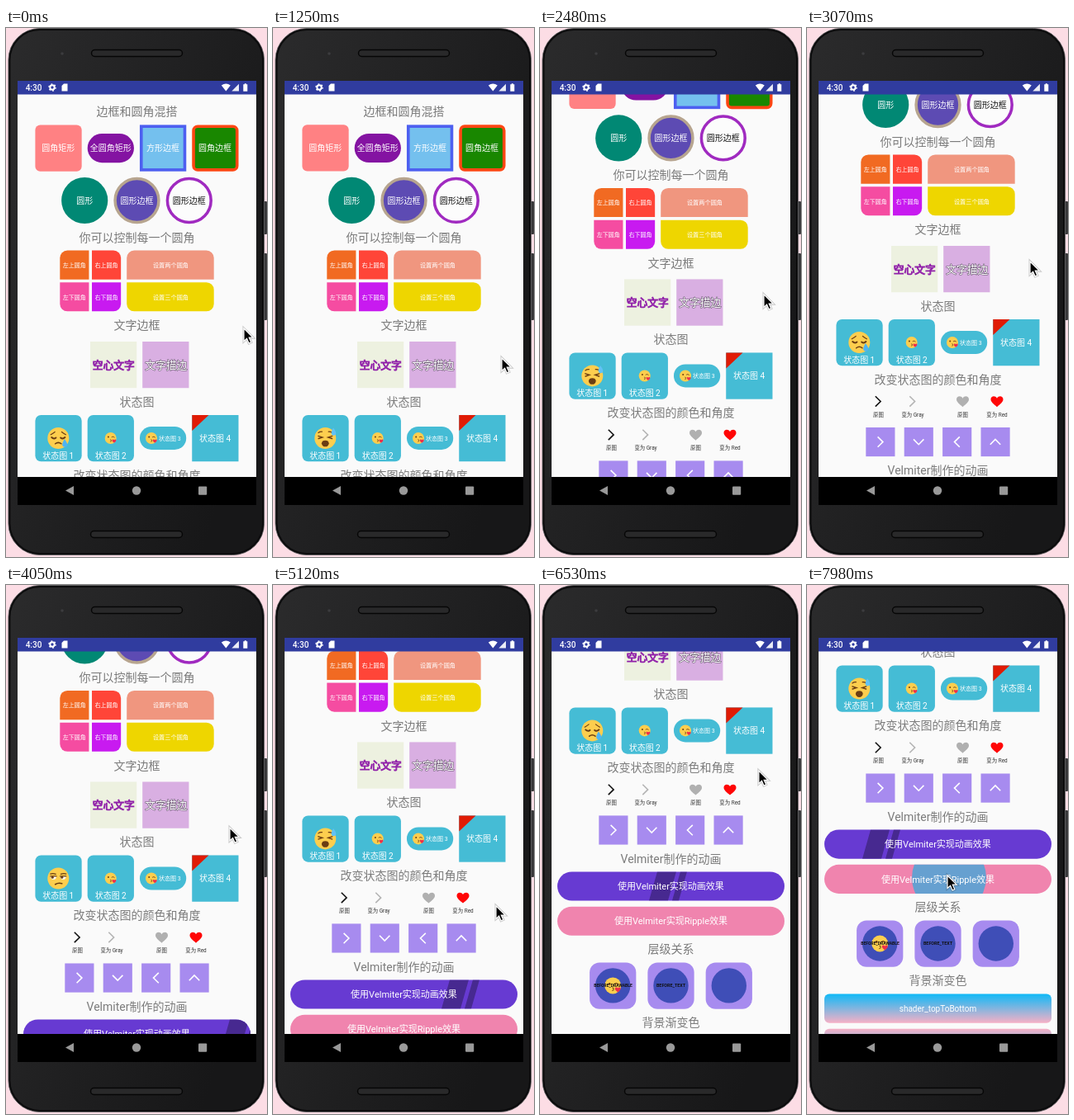
Animation of 316 by 641 pixels, one loop 8 s. Source, as an HTML page:

```html
<!DOCTYPE html>
<html lang="zh-CN">
<head>
<meta charset="utf-8">
<style>
html, body { margin: 0; width: 100%; height: 100%; overflow: hidden; background: #fcdde5; }
svg { display: block; width: 316px; height: 641px; }
text { font-family: Roboto, "Noto Sans CJK SC", "Noto Sans CJK", sans-serif; }
</style>
</head>
<body>
<svg id="stage" viewBox="0 0 316 641"></svg>
<script>
const LOOP = 8000;
const CX = 158.5;
const stage = document.getElementById('stage');

// ---- drawing helpers: each returns SVG markup ----
const path = (d, fill, extra = '') => `<path d="${d}" fill="${fill}" ${extra}/>`;
const line = (d, color, width) =>
  path(d, 'none', `stroke="${color}" stroke-width="${width}" stroke-linecap="round"`);
const rect = (x, y, w, h, fill, r = 0, extra = '') =>
  `<rect x="${x}" y="${y}" width="${w}" height="${h}" rx="${r}" fill="${fill}" ${extra}/>`;
const circle = (x, y, r, fill, extra = '') =>
  `<circle cx="${x}" cy="${y}" r="${r}" fill="${fill}" ${extra}/>`;
const label = (s, x, y, size, fill = '#fff', extra = '') =>
  `<text x="${x}" y="${y + size * 0.37}" font-size="${size}" fill="${fill}" text-anchor="middle" ${extra}>${s}</text>`;
const heading = (s, y) => label(s, CX, y, 14, '#7b7b7b');
const bordered = (color, width) => `stroke="${color}" stroke-width="${width}"`;
const at = (x, y, markup, scale = 1, rotation = 0) =>
  `<g transform="translate(${x} ${y}) rotate(${rotation}) scale(${scale})">${markup}</g>`;

// Rectangle with separate corner radii: top left, top right, bottom right, bottom left
function corners(x, y, w, h, fill, [a, b, c, d]) {
  return path(`M${x + a} ${y}h${w - a - b}a${b} ${b} 0 0 1 ${b} ${b}v${h - b - c}
    a${c} ${c} 0 0 1 ${-c} ${c}h${c + d - w}a${d} ${d} 0 0 1 ${-d} ${-d}v${a + d - h}
    a${a} ${a} 0 0 1 ${a} ${-a}z`, fill);
}

const chevron = (x, y, color, rotation = 0) =>
  at(x, y, path('M-3.2 -6.2L3.1 0L-3.2 6.2', 'none', bordered(color, 1.6)), 1, rotation);
const heart = (x, y, color, scale = 1) =>
  at(x, y, path('M0 6.5C-4 3-7.5 .5-7.5-2.6C-7.5-7-2-7.6 0-4C2-7.6 7.5-7 7.5-2.6C7.5 .5 4 3 0 6.5z', color), scale);

// ---- faces, drawn at radius 10 ----
const INK = '#6b3d12';
const features = {
  sad: line('M-7-3.2Q-5-4.3-3.2-5.8M7-3.2Q5-4.3 3.2-5.8', INK, 0.9) +
    line('M-6.2-.8Q-4.2 1.2-2.2-.4M6.2-.8Q4.2 1.2 2.2-.4', INK, 1.5) +
    line('M-2.8 5.2Q0 3 2.8 5.2', INK, 1.2) +
    path('M5.8 .8Q9.3 5.3 8.2 7.3Q6 9.5 3.9 7.1Q3.3 4.8 5.8 .8z', '#4fb4f2'),
  unamused: line('M-7.3-4.2Q-5-5-2.4-4M2.4-4Q5-5 7.3-4.2', INK, 1) +
    path('M-7.3-2h5.6q-.4 3-2.8 3t-2.8-3zM1.7-2h5.6q-.4 3-2.8 3t-2.8-3z', '#fff') +
    line('M-7.3-2h5.6M1.7-2h5.6', INK, 0.9) +
    circle(-5.4, -0.9, 1.2, INK) + circle(3.4, -0.9, 1.2, INK) +
    line('M-2.8 5.6Q0 3.8 3.4 4.8', INK, 1.2),
  sweat: line('M-6.5-5Q-5-6.2-3-6M6.5-5Q5-6.2 3-6', INK, 0.9) +
    line('M-6.5-2L-2.7-.8L-6.3 .4M6.5-2L2.7-.8L6.3 .4', INK, 1.1) +
    path('M-3.4 4.8Q-3 2.2 0 2.2T3.4 4.8Q3 8 0 8T-3.4 4.8z', INK) +
    path('M7.5-9.5Q11-5 9.6-3.2Q7.7-1.5 5.9-3.4Q5-5.5 7.5-9.5z', '#62c2f5'),
  kiss: circle(-4, -2, 1.4, INK) + line('M2-2Q4.5-4 6.5-1.5', INK, 1.2) +
    line('M-.5 2.5Q2.5 3 .5 4.3Q2.5 5.5-.5 6', INK, 1) + heart(6, 5, '#ee2f4a', 0.46)
};
const face = (kind, x, y, r) => at(x, y, circle(0, 0, 10, '#fdce4e') + features[kind], r / 10);

// ---- phone ----
const phone = `
  ${rect(311, 210, 5, 40, '#39393b', 1)}${rect(311, 273, 5, 81, '#39393b', 1)}
  ${rect(3, 0.5, 309.5, 638, 'url(#body)', 38, bordered('#5c5c5e', 1))}
  ${rect(4.5, 2, 306.5, 635, 'none', 36.5, bordered('#0c0c0d', 2))}
  ${rect(103.5, 26.5, 110, 8, '#29292a', 4, bordered('#060606', 1.5))}
  ${rect(102.5, 609.5, 111, 8, '#29292a', 4, bordered('#060606', 1.5))}
  ${circle(68, 31, 1.8, '#3c3c3e')}
  ${rect(14, 64, 289, 514, '#000')}${rect(14, 80, 289, 464, '#fafafa')}`;

const bars = `
  ${rect(14, 64, 289, 16.5, '#303c9f')}
  ${label('4:30', 33.5, 72.3, 10, '#fff', 'font-weight="500"')}
  ${circle(56, 72, 2.7, 'none', bordered('#fff', 2))}
  ${circle(56, 72, 4.1, 'none', bordered('#fff', 1.3) + ' stroke-dasharray="1.9 2.39"')}
  ${path('M70 67.5h4.5v9h-7v-6.5z', '#fff')}
  ${path('M260.8 69.5Q266.3 65.7 271.8 69.5L266.3 76.5z', '#fff')}
  ${path('M282 67.8v8.7h-8.7z', '#fff', 'opacity=".9"')}
  ${path('M288.8 67.3h2v1h1.5v8.4h-5v-8.4h1.5z', '#fff')}
  ${path('M82 555v11l-10-5.5z', '#999')}${circle(158, 560.5, 5.2, '#999')}
  ${rect(233, 555.5, 10.2, 10.2, '#999', 1)}`;

// ---- scrolling page ----
const TILE = '#45bcd5', LILAC = '#a78bef';
const BIG = 56.25, SMALL = 35.15;
const column = i => 35.4 + i * 63.28;

const shapes = `
  ${heading('边框和圆角混搭', 101)}
  ${rect(column(0), 117.4, BIG, BIG, '#ff8183', 6)}${label('圆角矩形', 63.2, 145.5, 10)}
  ${rect(column(1), 128, BIG, SMALL, '#8413a2', 17.5)}${label('全圆角矩形', 126.7, 145.5, 10)}
  ${rect(column(2) + 1.8, 119.2, 52.7, 52.7, '#74c0ee', 0, bordered('#4d5ff0', 3.6))}${label('方形边框', 190, 145.5, 10)}
  ${rect(column(3) + 1.8, 119.2, 52.7, 52.7, '#198700', 5, bordered('#ff4613', 3.6))}${label('圆角边框', 253, 145.5, 10)}
  ${circle(95.2, 209, 28.1, '#018874')}${label('圆形', 95.2, 209, 10)}
  ${circle(CX, 209, 26.4, '#5d4bb3', bordered('#b7a58f', 3.5))}${label('圆形边框', CX, 209, 10)}
  ${circle(221.8, 209, 26.4, '#fcfcfc', bordered('#a02ac0', 3.5))}${label('圆形边框', 221.8, 209, 10, '#111')}
  ${heading('你可以控制每一个圆角', 253.5)}
  ${corners(65.3, 269.5, SMALL, SMALL, '#f16a22', [9, 0, 0, 0])}${label('左上圆角', 82.8, 287, 7)}
  ${corners(104, 269.5, SMALL, SMALL, '#ff4538', [0, 9, 0, 0])}${label('右上圆角', 121.5, 287, 7)}
  ${corners(65.3, 308.2, SMALL, SMALL, '#f54ca1', [0, 0, 0, 9])}${label('左下圆角', 82.8, 326, 7)}
  ${corners(104, 308.2, SMALL, SMALL, '#c81af0', [0, 0, 9, 0])}${label('右下圆角', 121.5, 326, 7)}
  ${corners(146.2, 269.5, 105.5, SMALL, '#f0967f', [9, 9, 0, 0])}${label('设置两个圆角', 199.5, 287, 7.2)}
  ${corners(146.2, 308.2, 105.5, SMALL, '#eed600', [0, 9, 9, 9])}${label('设置三个圆角', 199.5, 326, 7.2)}
  ${heading('文字边框', 360)}
  ${rect(102, 380, BIG, BIG, '#edf1e0')}
  ${label('空心文字', 130.3, 408, 12.8, '#b95cc9', bordered('#8f1fa8', 0.9))}
  ${rect(165.2, 380, BIG, BIG, '#d9afe2')}
  ${label('文字描边', 193.8, 408, 12.8, '#fff', bordered('#64566b', 1.1) + ' paint-order="stroke"')}`;

const states = `
  ${heading('状态图', 452.5)}
  ${rect(column(0), 469, BIG, BIG, TILE, 7)}<g id="mood"></g>${label('状态图 1', 63.2, 518, 10)}
  ${rect(column(1), 469, BIG, BIG, TILE, 7)}${face('kiss', 126.7, 497, 7)}${label('状态图 2', 126.7, 518, 10)}
  ${rect(column(2), 483, BIG, 28, TILE, 14)}${face('kiss', 176, 497, 7)}${label('状态图 3', 198.3, 497, 7)}
  ${rect(column(3), 469, BIG, BIG, TILE)}${path('M225.3 469h20.2L225.3 488z', '#e01b05')}${label('状态图 4', 253, 497, 10)}
  ${heading('改变状态图的颜色和角度', 541.5)}
  ${chevron(86, 568.5, '#111')}${chevron(127.5, 568.5, '#b4b4b4')}
  ${heart(188.5, 568.7, '#b0b0b0')}${heart(230, 568.7, '#ff0606')}
  ${[['原图', 86.5], ['变为 Gray', 128], ['原图', 188.5], ['变为 Red', 230]]
    .map(([s, x]) => label(s, x, 584.5, 6.4, '#333')).join('')}
  ${[0, 90, 180, 270].map((turn, i) => rect(71.3 + i * 46.4, 600, SMALL, SMALL, LILAC) +
    chevron(88.8 + i * 46.4, 617.6, '#fff', turn)).join('')}`;

const effects = `
  ${heading('Velmiter制作的动画', 652)}
  ${rect(21, 668, 275, SMALL, '#673ad2', 17.6)}
  <g clip-path="url(#pill1)"><path id="stripes" d="M0 703.2l10-35.2h23l-10 35.2zM28 703.2l10-35.2h8l-10 35.2z" fill="#472990"/></g>
  ${label('使用Velmiter实现动画效果', CX, 685.6, 11)}
  ${rect(21, 710.3, 275, SMALL, '#f084ae', 17.6)}
  <g clip-path="url(#pill2)">${circle(172, 726, 0, '#66a0d0', 'id="ripple"')}</g>
  ${label('使用Velmiter实现Ripple效果', CX, 728, 11)}
  ${heading('层级关系', 761.5)}
  ${[88.2, CX, 228.8].map(x => rect(x - BIG / 2, 778, BIG, BIG, LILAC, 12) + circle(x, 806, 21.2, '#3f4eb7')).join('')}
  ${face('kiss', 88.2, 806, 10)}
  ${label('BEFORE_DRAWABLE', 88.5, 806, 5, '#111', 'font-weight="700"')}
  ${label('BEFORE_TEXT', CX, 806, 5.4, '#111', 'font-weight="700"')}
  ${heading('背景渐变色', 850.5)}
  ${rect(21, 867, 275, SMALL, 'url(#down)', 6)}${label('shader_topToBottom', CX, 884.5, 10)}
  ${rect(21, 909.3, 275, SMALL, 'url(#up)', 6)}`;

const gradient = (id, from, to, dir) =>
  `<linearGradient id="${id}" x1="0" y1="0" ${dir}><stop stop-color="${from}"/><stop offset="1" stop-color="${to}"/></linearGradient>`;
const clip = (id, markup) => `<clipPath id="${id}">${markup}</clipPath>`;

const ARROW = 'M0 0v15.5l3.6-3.3 2.5 5.7 2.7-1.2-2.5-5.5h4.9z';

stage.innerHTML = `<defs>
  ${gradient('body', '#2b2b2c', '#171718', 'x2="1" y2=".6"')}
  ${gradient('down', '#0fb9f7', '#f6b0c6', 'x2="0" y2="1"')}
  ${gradient('up', '#f6b0c6', '#0fb9f7', 'x2="0" y2="1"')}
  ${clip('screen', rect(14, 80, 289, 464, '#000'))}
  ${clip('pill1', rect(21, 668, 275, SMALL, '#000', 17.6))}
  ${clip('pill2', rect(21, 710.3, 275, SMALL, '#000', 17.6))}
  </defs>
  ${rect(0, 0, 316, 641, '#fcdde5')}${phone}
  <g clip-path="url(#screen)"><g id="page">${shapes}${states}${effects}</g></g>
  ${bars}
  <g id="cursor">${path(ARROW, 'none', bordered('#0003', 3))}${path(ARROW, '#000', bordered('#fff', 1.2))}</g>`;

// ---- motion ----
const scrollKeys = [[1250, 0], [1860, 22.5], [2480, 75.5], [3100, 118], [3760, 138],
  [4050, 141.5], [4600, 154], [5120, 189.5], [6530, 320.5], [7100, 371.5]];
const cursorKeys = [[0, 288, 364], [60, 287, 365], [530, 287, 365], [830, 277, 400], [1250, 277, 400],
  [1860, 275, 377], [2480, 271, 323], [3100, 270, 281], [4050, 271, 294], [4600, 271, 424],
  [5120, 270, 389], [6530, 265, 225], [7100, 215, 320], [7600, 170, 352]];
const stripeKeys = [[4050, 261], [5120, 204], [6530, 132], [7980, 67]];
const rippleKeys = [[7620, 0], [7980, 45]];
const moods = { s: 'sad', u: 'unamused', w: 'sweat' };
const moodOrder = 'suwuswswuswuwsusw';

function track(keys, t, column = 1) {
  const next = keys.findIndex(key => key[0] > t);
  if (next === 0) return keys[0][column];
  if (next < 0) return keys[keys.length - 1][column];
  const a = keys[next - 1], b = keys[next];
  return a[column] + (b[column] - a[column]) * (t - a[0]) / (b[0] - a[0]);
}

const [page, mood, stripes, ripple, cursor] =
  ['page', 'mood', 'stripes', 'ripple', 'cursor'].map(id => document.getElementById(id));
const move = (el, x, y) => el.setAttribute('transform', `translate(${x} ${y})`);
let shownMood;

function render(t) {
  move(page, 0, -track(scrollKeys, t));
  move(stripes, track(stripeKeys, t), 0);
  move(cursor, track(cursorKeys, t), track(cursorKeys, t, 2));
  ripple.setAttribute('r', track(rippleKeys, t));
  const kind = moods[moodOrder[Math.floor((t + 240) / 500)]];
  if (kind !== shownMood) mood.innerHTML = face(shownMood = kind, 63.3, 497, 13);
}

const start = performance.now();
function tick() {
  render((performance.now() - start) % LOOP);
  requestAnimationFrame(tick);
}
tick();
</script>
</body>
</html>
```
